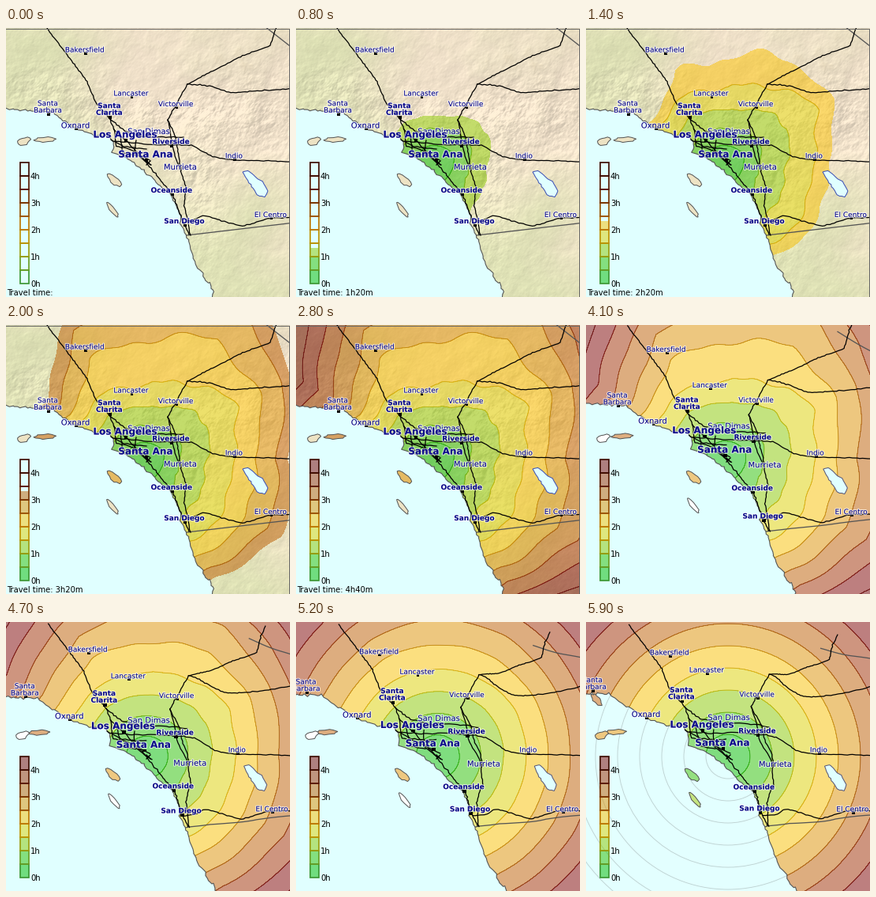
Recreate the animation shown at these times as a matplotlib script. Size 360x340 px, loop 6000 ms.

```python
import numpy as np
import matplotlib.pyplot as plt
from matplotlib.animation import FuncAnimation
from matplotlib.colors import LinearSegmentedColormap
from matplotlib.patches import Circle, Polygon, Rectangle
from matplotlib.patheffects import withStroke

W, H, STEP, FRAMES = 360, 340, 100, 60
CX, CY = 180, 170
PX_PER_MIN = 28 / 30
SEA = (224 / 255, 1, 1)
NAVY = "#0c0c8a"
LAND_TAN = np.array([0.93, 0.89, 0.77])

# Distance reached after each travel time, by compass angle (counter-clockwise)
TIMES = np.array([0, 30, 60, 120, 180, 300, 480])
LAND_REACH = {
    0: [20, 40, 108, 163, 255],
    30: [22, 46, 130, 196, 280],
    60: [20, 44, 110, 232, 320],
    90: [21, 42, 88, 215, 310],
    120: [24, 46, 100, 190, 300],
    150: [26, 48, 98, 130, 220],
    300: [22, 52, 120, 158, 235],
    330: [20, 40, 112, 175, 290],
}
REACH = [
    [0] + LAND_REACH[a] + [LAND_REACH[a][-1] + 160]
    if a in LAND_REACH else TIMES * PX_PER_MIN
    for a in range(0, 360, 30)
]

BANDS = ["#01bd01", "#29c100", "#89c900", "#ddd100", "#f9c100",
         "#dd9100", "#bd5d00", "#9f2d00", "#7d0000", "#6e0000"]
BANDS = [plt.matplotlib.colors.to_rgb(c) for c in BANDS]
INK = LinearSegmentedColormap.from_list(
    "ink", ["#3c9632", "#78a01e", "#be9b00", "#be7800", "#8c4600", "#641e00", "#3c0a00"])

COAST = [(-90, 92), (0, 103), (57, 106), (90, 128), (115, 136), (132, 136), (138, 150),
         (135, 158), (150, 162), (172, 178), (210, 212), (222, 237), (221, 247),
         (229, 262), (240, 298), (263, 331), (261, 340), (285, 410)]
LAND = COAST + [(480, 410), (480, -90), (-90, -90), (-90, 92)]
LAKE = [(300, 182), (306, 180), (325, 194), (332, 206), (328, 214), (318, 211),
        (300, 182)]

# centre, half length, half width, tilt, final shift, arrival time by sea
ISLANDS = [
    ((50, 141), 14, 3, -3, (-12, -2), 190),
    ((23, 143), 8, 4.5, -15, (-3, 0), None),
    ((138, 193), 11, 4.5, 40, (-3, 1), 160),
    ((135, 230), 12, 2.8, 52, (3, -5), None),
]

NORTH = [(52, 0), (103, 68), (114, 95), (131, 114), (137, 128), (152, 142), (178, 170),
         (212, 212), (225, 247), (232, 261)]
DESERT = [(347, -15), (335, 22), (300, 35), (230, 71), (205, 116), (213, 158),
          (228, 200), (226, 225), (234, 262)]
EAST = [(230, 71), (258, 73), (285, 82), (400, 74)]
VALLEY = [(138, 143), (180, 147), (235, 148), (262, 163), (290, 167), (400, 170)]
SOUTH = [(225, 247), (250, 237), (300, 251), (335, 240), (400, 239)]
INNER = [(205, 116), (215, 138), (222, 180)]
FOOTHILL = [(131, 114), (150, 130), (175, 138), (225, 138)]
HARBOR = [(137, 128), (140, 150), (155, 152), (182, 167)]
CROSS = [(133, 141), (150, 150), (178, 153)]
SPUR = [(145, 137), (148, 158), (165, 161)]
RING = [(165, 142), (163, 158), (184, 173)]
ROADS = [NORTH, DESERT, EAST, VALLEY, SOUTH, INNER, FOOTHILL, HARBOR, CROSS, SPUR, RING]
BORDERS = [[(229, 262), (400, 242)], [(328, -2), (400, 54)]]

# name, start, end
TOWNS = [
    ("Bakersfield", (100, 28), (106, 39)),
    ("Lancaster", (158.5, 83), (153, 61)),
    ("Victorville", (215.5, 96.5), (217, 92)),
    ("Santa\nBarbara", (53, 100), (8, 78)),
    ("Indio", (289, 162), (295, 162)),
    ("El Centro", (335.5, 236.5), (338, 237)),
]
WIDE_TOWNS = [
    ("Oxnard", (88, 123.5), (76, 117)),
    ("San Dimas", (181, 131), (181, 121)),
    ("Murrieta", (221, 176), (240, 180)),
]
CITIES = [
    ("Santa\nClarita", (131, 103), (121, 90.5)),
    ("Riverside", (209, 144), (217, 138)),
    ("Oceanside", (210, 205.5), (213, 209)),
    ("San Diego", (226, 244.5), (220, 236)),
]
METROS = [
    ("Los Angeles", (151, 135), (147, 130)),
    ("Santa Ana", (177, 160), (173, 153)),
]
UNMARKED = ("San Dimas", "Murrieta")


def travel_time(x, y):
    """Minutes from the centre to a point on the plain map."""
    dx, dy = x - CX, y - CY
    r, angle = np.hypot(dx, dy), np.arctan2(-dy, dx)
    sector = np.degrees(angle) % 360 / 30
    low = np.floor(sector).astype(int)
    w = sector - low
    rows = [np.interp(r, row, TIMES) for row in REACH]
    t = (1 - w) * np.choose(low % 12, rows) + w * np.choose((low + 1) % 12, rows)
    ripple = np.sin(9 * angle + r / 25) + 0.6 * np.sin(17 * angle - r / 31)
    return t + 2.5 * ripple * np.minimum(1, r / 90) ** 2


def warp(x, y, p):
    """Slide points radially until distance is proportional to time."""
    r = np.maximum(np.hypot(x - CX, y - CY), 1e-6)
    s = 1 - p + p * PX_PER_MIN * travel_time(x, y) / r
    return CX + (x - CX) * s, CY + (y - CY) * s


def dense(points, gap=4):
    out = []
    for a, b in zip(points, points[1:]):
        n = max(1, int(np.hypot(b[0] - a[0], b[1] - a[1]) / gap))
        out += [np.add(a, np.subtract(b, a) * i / n) for i in range(n)]
    return np.array(out + [points[-1]], float)


def rugged(points, rng, amount=0.7):
    pts = dense(points, 3)
    pts[1:-1] += rng.normal(0, amount, pts[1:-1].shape)
    return pts


def islet(center, a, b, tilt, rng):
    t = np.linspace(0, 2 * np.pi, 14, endpoint=False)
    k = 1 + rng.uniform(-0.2, 0.2, t.size)
    u, v, q = a * k * np.cos(t), b * k * np.sin(t), np.radians(tilt)
    return np.column_stack([center[0] + u * np.cos(q) - v * np.sin(q),
                            center[1] + u * np.sin(q) + v * np.cos(q)])


def bump(x, y, cx, cy, sx, sy):
    return np.exp(-((x - cx) / sx) ** 2 - ((y - cy) / sy) ** 2)


def make_terrain(rng):
    y, x = np.mgrid[0:H, 0:W].astype(float)
    f = np.hypot(np.fft.fftfreq(H)[:, None], np.fft.fftfreq(W)[None])
    f[0, 0] = 1
    height = np.fft.ifft2(np.fft.fft2(rng.normal(size=(H, W))) / f ** 1.7).real
    height = (height - height.mean()) / height.std()
    gy, gx = np.gradient(height)
    shade = (gx + gy) / (gx + gy).std()
    rough = (0.35 + bump(x, y, 150, 112, 110, 22) + bump(x, y, 245, 190, 28, 80)
             + 0.8 * bump(x, y, 310, 110, 70, 60) + 0.8 * bump(x, y, 60, 75, 60, 25))
    inland = 0.68 * x - 0.73 * (y - 103)
    green = (np.exp(-(inland / 105) ** 2) + 0.6 * bump(x, y, 70, 25, 60, 40)
             + 0.6 * bump(x, y, 325, 225, 40, 45))
    green = np.clip(green + 0.12 * height, 0, 1)[..., None]
    rgb = green * np.array([0.87, 0.88, 0.71]) + (1 - green) * np.array([0.94, 0.88, 0.79])
    rgb = rgb * (1 + 0.05 * np.clip(shade * rough, -2.5, 1.5))[..., None]
    high = np.clip(height * rough - 0.7, 0, 1)[..., None]
    return np.clip(rgb - high * np.array([0.05, 0.08, 0.09]), 0, 1)


rng = np.random.default_rng(4)
terrain = make_terrain(rng)
land = rugged(LAND, rng)
lake = rugged(LAKE, rng, 0.4)
roads = [rugged(r, rng, 0.35) for r in ROADS]
borders = [dense(b) for b in BORDERS]
islands = [(islet(c, a, b, tilt, rng), shift, arrival)
           for c, a, b, tilt, shift, arrival in ISLANDS]
headland = islet((13, 98), 9, 4, 45, rng)

theta, radius = np.meshgrid(np.linspace(0, 2 * np.pi, 241), np.linspace(0, 420, 106))
grid_x, grid_y = CX + radius * np.cos(theta), CY - radius * np.sin(theta)
grid_t = travel_time(grid_x, grid_y)

fig = plt.figure(figsize=(3.6, 3.4), dpi=100)
ax = fig.add_axes([0, 0, 1, 1])


def pt(px):
    return px * 0.72


def smooth(v):
    v = min(max(v, 0), 1)
    return v * v * (3 - 2 * v)


def band(minutes):
    return BANDS[min(int(minutes // 30), 9)]


def line(pts, p, color, width, z):
    ax.plot(*warp(pts[:, 0], pts[:, 1], p), color=color, lw=pt(width), zorder=z)


def draw_zones(limit, p, patch):
    if limit <= 0:
        return
    x, y = warp(grid_x, grid_y, p)
    top = 1000 if limit >= 280 else limit
    levels = [v for v in range(0, 300, 30) if v < top]
    fills = ax.contourf(x, y, grid_t, [-20] + levels[1:] + [top],
                        colors=BANDS[:len(levels)], alpha=0.5, zorder=2)
    fills.set_clip_path(patch)
    if len(levels) > 1:
        lines = ax.contour(x, y, grid_t, levels[1:], alpha=0.6, linewidths=pt(0.9),
                           colors=[tuple(0.75 * v for v in band(t)) for t in levels[1:]],
                           zorder=3)
        lines.set_clip_path(patch)


def draw_islands(limit, p, plain):
    base = plain * LAND_TAN + (1 - plain)
    for pts, shift, arrival in islands:
        pos = pts + np.multiply(shift, p)
        mid = pos.mean(axis=0)
        if p > 0.97:
            arrival = np.hypot(mid[0] - CX, mid[1] - CY) / PX_PER_MIN
        reached = arrival is not None and limit >= arrival
        face = 0.5 * base + 0.5 * np.array(band(arrival)) if reached else base
        ax.add_patch(Polygon(pos, fc=face, ec="#555555", lw=pt(1), zorder=4))
    if p > 0.97:
        face = 0.5 + 0.5 * np.array(band(200))
        ax.add_patch(Polygon(headland, fc=face, ec="#555555", lw=pt(1), zorder=4))


def draw_places(places, p, size, drop, bold=False):
    halo = [withStroke(linewidth=pt(2.2), foreground=(1, 1, 1, 0.65))]
    r = 2.4 if bold else 1.9
    for name, start, end in places:
        x, y = np.add(start, np.multiply(np.subtract(end, start), p))
        if name not in UNMARKED:
            low = y + drop + 5 * name.count("\n")
            ax.add_patch(Rectangle((x + 1 - r, low - r * 0.8), 2 * r, 1.6 * r,
                                   fc="black", zorder=7))
        ax.text(x, y, name, color=NAVY, fontsize=pt(size), family="DejaVu Sans",
                weight="bold" if bold else "normal", ha="center", va="center",
                linespacing=0.95, path_effects=halo, zorder=8)


def draw_legend(limit):
    left, width, bottom, cell = 18, 11, 323, 17
    for i in range(9):
        y = bottom - cell * i
        part = min(max(limit / 30 - i, 0), 1) * cell
        ax.add_patch(Rectangle((left, y - part), width, part, fc=BANDS[i], alpha=0.5,
                               lw=0, zorder=9))
        ax.add_patch(Rectangle((left, y - cell), width, cell, fill=False,
                               ec=INK(i / 8), lw=pt(1.7), zorder=10))
    for h in range(5):
        ax.text(31, bottom - 34 * h, f"{h}h", fontsize=pt(10), family="DejaVu Sans",
                va="center_baseline", zorder=10)


def draw(i):
    ms = i * STEP
    limit = ms / 10
    plain = min(max(1 - (ms - 2800) / 400, 0), 1)
    p = smooth((ms - 3200) / 2500)
    rings = min(max((ms - 5200) / 600, 0), 1)

    ax.clear()
    ax.set(xlim=(0, W), ylim=(H, 0))
    ax.axis("off")
    ax.add_patch(Rectangle((0, 0), W, H, fc=SEA, zorder=0))

    outline = np.column_stack(warp(land[:, 0], land[:, 1], p))
    patch = Polygon(outline, fc="white", lw=0, zorder=1)
    ax.add_patch(patch)
    if plain > 0:
        image = ax.imshow(terrain, extent=(0, W, H, 0), alpha=plain, aspect="auto", zorder=1.5)
        image.set_clip_path(patch)
        ax.plot([0, 358.5, 358.5], [0.5, 0.5, H], color="#666666", alpha=plain,
                lw=pt(1), zorder=6)
    draw_zones(limit, p, patch)
    ax.add_patch(Polygon(outline, fill=False, ec="#555555", lw=pt(1.1), zorder=4))
    if rings > 0:
        for k in range(1, 10):
            ax.add_patch(Circle((CX, CY), 28 * k, fill=False, ec="#9aa5a5",
                                alpha=0.5 * rings, lw=pt(0.9), zorder=0.8))
        ax.add_patch(Rectangle((0, 0), W, H, fc="white", alpha=0.12 * rings, zorder=0.5))

    draw_islands(limit, p, plain)
    x, y = warp(lake[:, 0], lake[:, 1], p)
    ax.add_patch(Polygon(np.column_stack([x, y]), fc=SEA, lw=pt(1),
                         ec="#3c50b4" if plain > 0.5 else "#555577", zorder=4))
    for b in borders:
        line(b, p, "#555555", 1.3, 4)
    for r in roads:
        line(r, p, "black", 1.25, 5)
    ax.plot([CX], [CY], "x", color="black", ms=pt(6), mew=pt(1.3), zorder=7)
    draw_places(TOWNS, p, 9, 4)
    draw_places(WIDE_TOWNS, p, 10, 4)
    draw_places(CITIES, p, 9, 5, bold=True)
    draw_places(METROS, p, 12, 7, bold=True)
    draw_legend(limit)

    if plain > 0:
        minutes = min(int(limit), 280)
        clock = f" {minutes // 60}h{minutes % 60:02d}m" if minutes else ""
        ax.text(1, 338, "Travel time:" + clock, fontsize=pt(10), family="DejaVu Sans",
                va="baseline", alpha=plain, zorder=10)
    return []


anim = FuncAnimation(fig, draw, frames=FRAMES, interval=STEP, init_func=lambda: [],
                     repeat=True, repeat_delay=0, blit=False)
plt.show()
```
